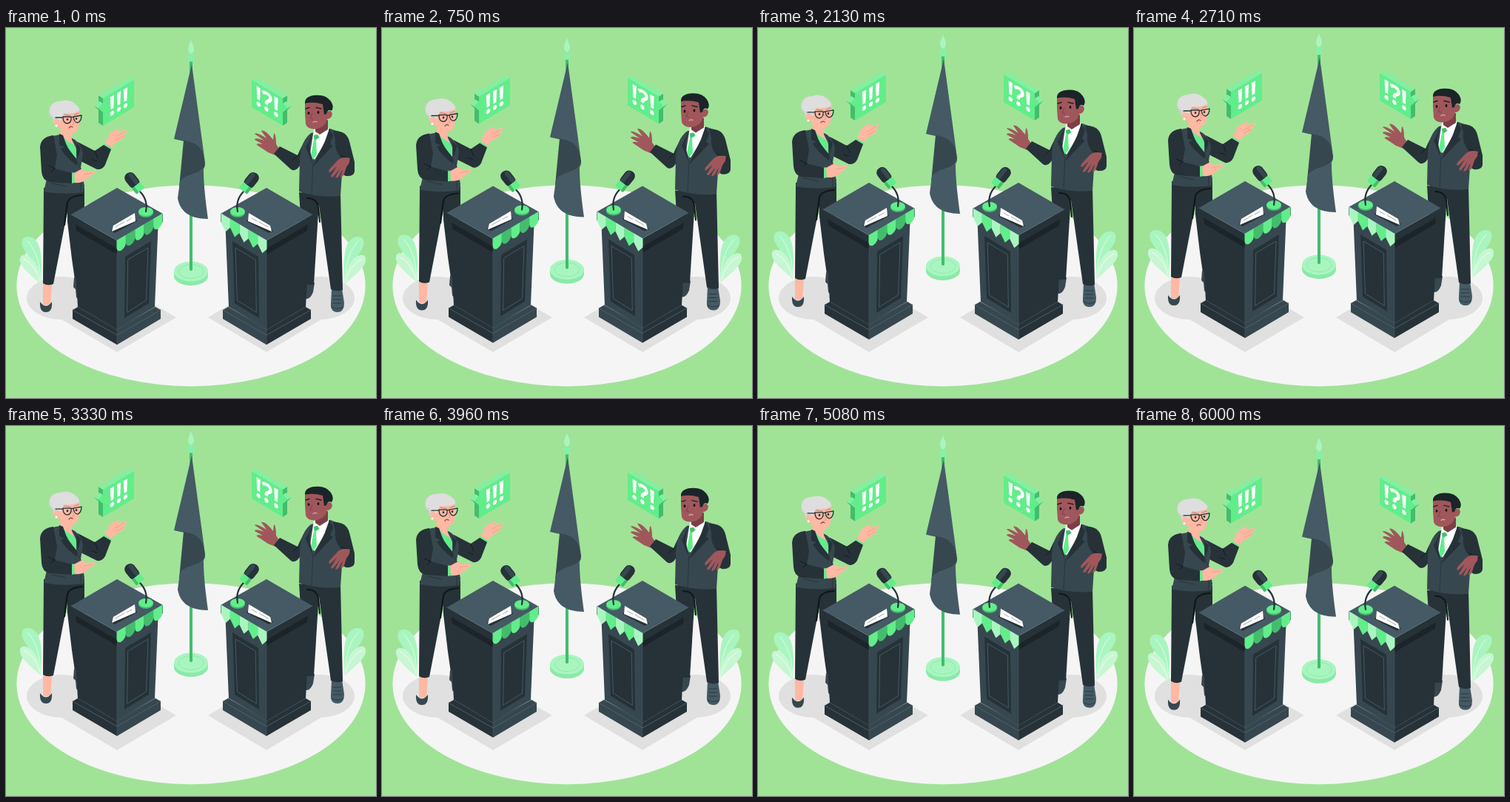
Animation of 500 by 500 pixels, one loop 6040 ms. Source, as an HTML page with a canvas:

```html
<!DOCTYPE html>
<html lang="en">
<head>
<meta charset="utf-8">
<title>Debate</title>
<style>
html, body { margin: 0; width: 100%; height: 100%; overflow: hidden; background: #a0e397; }
canvas { display: block; width: 500px; height: 500px; }
</style>
</head>
<body>
<canvas id="stage"></canvas>
<script>
const LOOP = 6040, RISE = 10;
const INK = '#263238', SLATE = '#37474f', STEEL = '#455a64', NIGHT = '#1b2429';
const GREEN = '#62ed8b', LEAF = '#43bd6c', MINT = '#a9f5c0', PALE = '#c6f7d2';
const ROSE = '#ffb8a2', ROSE2 = '#e88f7c', BROWN = '#a0575b', BROWN2 = '#7c3f46', GREY = '#e0e0e0';

const canvas = document.getElementById('stage');
const ctx = canvas.getContext('2d');
const dpr = window.devicePixelRatio || 1;
canvas.width = canvas.height = 500 * dpr;

const cache = new Map();
function path(d) {
  if (!cache.has(d)) cache.set(d, new Path2D(d));
  return cache.get(d);
}
function fill(color, d) {
  ctx.fillStyle = color;
  ctx.fill(path(d));
}
function line(color, d, width = 1) {
  ctx.strokeStyle = color;
  ctx.lineWidth = width;
  ctx.stroke(path(d));
}
function oval(color, x, y, rx, ry) {
  ctx.fillStyle = color;
  ctx.beginPath();
  ctx.ellipse(x, y, rx, ry, 0, 0, Math.PI * 2);
  ctx.fill();
}
function pill(color, x, y, w, h, r) {
  ctx.fillStyle = color;
  ctx.beginPath();
  ctx.roundRect(x, y, w, h, r);
  ctx.fill();
}
function mirror(sum, draw) {
  ctx.save();
  ctx.transform(-1, 0, 0, 1, sum, 0);
  draw();
  ctx.restore();
}

function ground() {
  ctx.fillStyle = '#a0e397';
  ctx.fillRect(0, 0, 500, 500);
  oval('#f5f5f5', 250, 348.2, 235.6, 136);
  oval(GREY, 75, 365, 47, 29);
  oval(GREY, 424, 365, 47, 29);
  fill(GREY, 'M150 438L230 391L150 345L70 391Z');
  fill(GREY, 'M352 438L273 391L352 345L431 391Z');
}

function plant() {
  fill(MINT, 'M47 346C42 324 30 309 23 297C19 287 23 281 31 282C45 284 51 302 47 346Z');
  line('#e6fceb', 'M29 288C40 299 46 318 47 340', 0.9);
  fill(PALE, 'M47 346C38 338 21 325 19 315C18 308 22 305 29 308C40 313 47 327 47 346Z');
  line('#f3fef6', 'M24 312C36 318 43 330 46 342', 0.9);
}

function flag() {
  oval('#8aeaa9', 250, 335, 23, 13);
  fill('#8aeaa9', 'M227 329H273V335H227Z');
  oval(MINT, 250, 329, 23, 13.5);
  line('#8aeaa9', 'M233 329A17 9.5 0 0 0 267 329A17 9.5 0 0 0 233 329', 0.9);
  fill(LEAF, 'M248 40H252V327Q250 329 248 327Z');
  fill('#86f0a6', 'M245 37Q250 33 255 37L254 44Q250 47 246 44Z');
  fill(MINT, 'M250 16C252 22 254 25 254 29Q253 34 250 35Q247 34 246 29C246 25 248 22 250 16Z');
  fill(STEEL, 'M251 49L227 150C244 154 267 156 269 182Z');
  fill(SLATE, 'M240 152C254 154 267 159 269 182C270 195 254 196 244 201L234 215Z');
  fill(STEEL, 'M269 184C270 198 240 196 235 208L232 230C235 247 247 258 273 258C270 236 267 212 267 192Z');
}

function bubble() {
  fill(LEAF, 'M125 91L131 95V132L125 128Z');
  fill('#83efa3', 'M125 91L167 67L173 70L131 95Z');
  fill(GREEN, 'M131 95L173 70V107L131 132Z');
  fill('#83efa3', 'M119 105L126 99L131 102L125 109Z');
  fill(LEAF, 'M119 105L125 109L131 114L126 112Z');
  fill(GREEN, 'M125 109L131 102V114Z');
}
function marks(text, x, slope) {
  ctx.save();
  ctx.transform(0.866, slope, 0, 1, x, 112.5);
  ctx.font = '700 36px "Open Sans", "Noto Sans", sans-serif';
  ctx.textAlign = 'center';
  ctx.fillStyle = '#fff';
  ctx.fillText(text, 0, 0);
  ctx.restore();
}

function woman() {
  // legs and shoes
  fill(INK, 'M82 222H106V250L98 340H93L89 312L83 262Z');
  fill(SLATE, 'M92 337L98 339L97 366L95 364L94 353L91 350Z');
  fill(ROSE, 'M50 344L62 345L60 374H50Z');
  fill(SLATE, 'M46 370Q54 381 62 370Q63 384 54 384Q45 384 46 370Z');
  fill(INK, 'M51 216H106V238Q90 235 84 242L64 346Q56 349 50 345Z');
  line('#0f171b', 'M103 226Q86 227 83 236L79 266', 2.2);
  // far arm
  fill(ROSE, 'M133 158L139 144Q147 136 154 136L151 141L163 137Q165 139 158 145Q162 144 160 148L147 156L141 164Z');
  line(ROSE2, 'M148 147L160 140M149 151L159 146', 0.6);
  fill(GREEN, 'M133 156L143 162L141 166L131 160Z');
  fill(INK, 'M97 154L120 166L132 158L142 164L134 185Q130 192 123 191L101 180Z');
  line('#0f171b', 'M120 166L124 176M116 178L123 180', 0.8);
  // torso
  fill(SLATE, 'M63 146L78 143L93 151Q103 158 104 170L101 189L106 213L105 222Q78 226 51 221L56 200V165Z');
  fill(ROSE, 'M73 136L88 141L89 151L95 163L80 152L74 145Z');
  fill(GREEN, 'M76 146L82 152L92 158L95 164L95 177Q84 165 76 146Z');
  fill(INK, 'M72 143L77 145L83 162L96 178L96 186Q80 174 74 163L79 161L72 158Z');
  fill(INK, 'M89 149L95 157L97 177L101 162Z');
  line(INK, 'M96 180L101 190V222M62 210L81 214', 0.9);
  // near arm
  fill(ROSE, 'M90 197L101 191Q106 190 107 194L120 193Q123 194 117 198L109 205Q103 210 91 209Z');
  line(ROSE2, 'M105 198L116 196', 0.6);
  fill(GREEN, 'M88 196L92 195L93 209L89 210Z');
  fill(INK, 'M64 145Q47 147 46 161L48 194Q49 206 59 208L89 210V196L66 190L69 172Z');
  line('#0f171b', 'M66 190L57 186M66 190L61 194', 0.9);
  // head
  fill('#d2d2d2', 'M58 113Q58 100 73 99Q85 95 96 105Q102 112 97 120L78 126L70 132Q62 128 63 122Q58 119 58 113Z');
  fill(ROSE, 'M75 114Q87 115 98 110L100 122L98 134Q94 145 84 143Q77 140 73 134Q65 135 65 127Q65 122 70 123L74 126Z');
  fill('#dedede', 'M59 113Q60 99 74 99Q86 95 95 104Q100 108 99 112Q88 117 78 115L74 125L70 122Q60 120 59 113Z');
  oval('#fff', 68, 132, 1.5, 1.5);
  line(INK, 'M67 121L77 121M77 120L88 120Q89 128 83 129Q77 129 77 120M91 120L102 118Q102 126 97 128Q92 128 91 120M88 121L91 120', 1.3);
  oval(INK, 83, 123.5, 1.3, 1.6);
  oval(INK, 95, 122.5, 1.3, 1.6);
  line('#9a8f8c', 'M79 117L87 118.5M92 117.5L98 115', 1);
  line(ROSE2, 'M89 123L92 130L89 131', 0.8);
  line('#8a4b45', 'M85 135Q87 132 90 134', 1.3);
}

function man() {
  // legs and shoes
  fill(SLATE, 'M405 346L417 344L415 357Q411 367 405 366Z');
  fill(INK, 'M396 222L422 225V250L416 347H404Z');
  fill(STEEL, 'M440 352H454L457 371Q457 384 448 384Q438 384 439 372Z');
  line(INK, 'M442 362H453M442 367H453M442 372H453M440 377Q448 382 456 377', 0.8);
  fill(INK, 'M400 222H452L455 354Q447 357 439 353L423 240L406 232Z');
  line('#0f171b', 'M407 230Q420 230 422 242L424 262', 2);
  // far arm
  fill(BROWN, 'M364 172L354 168L339 158Q337 155 347 157L336 151Q336 147 349 152L336 143Q338 140 352 149L345 139Q348 137 356 145L361 151L362 142Q365 143 365 157L369 163Z');
  fill(INK, 'M414 143Q404 148 394 172L370 160L362 170L385 191Q391 195 397 186L408 168Z');
  line('#0f171b', 'M388 178L395 172', 0.8);
  // torso
  fill(SLATE, 'M412 142L438 136L458 143L455 182L452 227Q424 230 396 221L397 178Q398 153 412 142Z');
  fill('#fff', 'M416 137L436 135L437 145L417 178L411 169Z');
  fill(BROWN2, 'M418 127L435 124V137L424 144L418 140Z');
  fill(GREEN, 'M416 145L421 144L424 148L419 151L420 171L415 178L412 172L416 151Z');
  fill(LEAF, 'M416 145L421 144L423 148L418 151Z');
  fill(INK, 'M414 141L410 159L414 183L405 161L408 156Z');
  fill(INK, 'M437 136L442 145L438 157L442 159L415 187L431 153Z');
  line(INK, 'M415 182L413 224', 0.8);
  // near arm
  fill(INK, 'M442 139Q460 138 464 153L471 181V194Q470 201 459 200L450 195L453 176Q443 164 445 151Z');
  line('#0f171b', 'M453 172L467 179M455 184L464 181', 0.8);
  fill(BROWN, 'M465 176Q454 173 448 179L437 191Q435 195 438 195L447 187L439 200Q440 203 443 200L451 190L445 202Q447 204 450 200L455 191L452 201Q454 203 457 197L460 188L464 182Z');
  // head
  fill(BROWN, 'M404 102Q418 97 430 102L433 114Q439 109 441 116Q440 123 434 123Q432 133 421 136Q408 138 405 130L404 115Z');
  fill(NIGHT, 'M404 102Q403 93 416 91Q432 89 439 99Q444 107 440 112Q435 109 433 116L430 117L428 103Q415 99 404 102Z');
  oval('#111', 409, 115, 1.4, 1.9);
  oval('#111', 422, 114, 1.4, 1.9);
  line(NIGHT, 'M405 109L410 107.500M419 107.500L426 109', 1.5);
  line(BROWN2, 'M414 115L411 122L415 123', 0.9);
  line('#e0a3a0', 'M415 127.500Q418 125.500 420 127', 1.3);
}

function drape(pointed) {
  const step = 12.4, fall = 7.3;
  for (let i = 0; i < 5; i++) {
    const x = 149.5 + i * step, y = 287 - i * fall;
    ctx.beginPath();
    ctx.moveTo(x, y);
    ctx.lineTo(x + step, y - fall);
    if (pointed) {
      ctx.lineTo(x + step, y - fall + 12);
      ctx.lineTo(x + step / 2, y - fall / 2 + 21);
      ctx.lineTo(x, y + 12);
    } else {
      ctx.lineTo(x + step, y - fall + 10);
      ctx.bezierCurveTo(x + step, y + 12, x, y + 20, x, y + 9);
    }
    ctx.closePath();
    ctx.fillStyle = i % 2 ? (pointed ? GREEN : LEAF) : (pointed ? MINT : GREEN);
    ctx.fill();
  }
}

function podium(pointed) {
  // plinth
  fill(INK, 'M90 381L150 415V428L90 393Z');
  fill(SLATE, 'M150 415L209 381V393L150 428Z');
  fill(SLATE, 'M150 405L202 377L209 381L150 415Z');
  fill(INK, 'M90 381L97 377L150 405V415Z');
  line(STEEL, 'M90 381L150 415L209 381M97 377L150 408L202 377', 0.7);
  // body
  fill(INK, 'M90 257L150 291V406L97 377Z');
  fill(SLATE, 'M150 288L206 256L201 377L150 406Z');
  fill(NIGHT, 'M94 265L150 297V306L95 274Z');
  line(STEEL, 'M150 302V427', 0.6);
  fill(INK, 'M161 309L196 288L193 372L160 392Z');
  line(STEEL, 'M165 313L192 297L189.500 368L164 384Z', 1);
  // top slab
  fill(INK, 'M88 252L150 287V298L90 263Z');
  fill(SLATE, 'M150 287L212 251V262L150 298Z');
  fill(STEEL, 'M150 216L212 251L150 287L88 252Z');
  line('#5b6f79', 'M88 252L150 287', 0.7);
  drape(pointed);
  // name card
  fill(INK, 'M141 274L173 256L177 261L147 277Z');
  fill('#fff', 'M145 267L174 250L175 261L143 275Z');
  line('#a8a8a8', 'M148 269L160 262M163 261L170 257', 1);
  // microphone
  oval(LEAF, 189, 250, 10, 6);
  oval(GREEN, 189, 248, 10, 6);
  line(INK, 'M189 248Q192 232 181 221', 2.2);
  ctx.save();
  ctx.translate(172.5, 208.5);
  ctx.rotate(0.9);
  pill(INK, -15, -7.5, 23, 15, 7);
  pill(SLATE, -13, -6, 18, 6, 3);
  pill(GREEN, 5, -7, 10, 14, 1);
  pill(LEAF, 5, 3, 10, 4, 1);
  ctx.restore();
}

function scene() {
  plant();
  mirror(505, plant);
  flag();
  bubble();
  mirror(505, bubble);
  marks('!!!', 152.5, -0.5);
  marks('!?!', 353, 0.5);
  woman();
  man();
  podium(false);
  mirror(502, () => podium(true));
}

function frame() {
  const p = (performance.now() % LOOP) / LOOP;
  const lift = RISE * (1 - Math.abs(1 - 2 * p));
  ctx.setTransform(dpr, 0, 0, dpr, 0, 0);
  ctx.lineJoin = ctx.lineCap = 'round';
  ground();
  ctx.translate(0, -lift);
  scene();
  requestAnimationFrame(frame);
}
frame();
</script>
</body>
</html>
```
